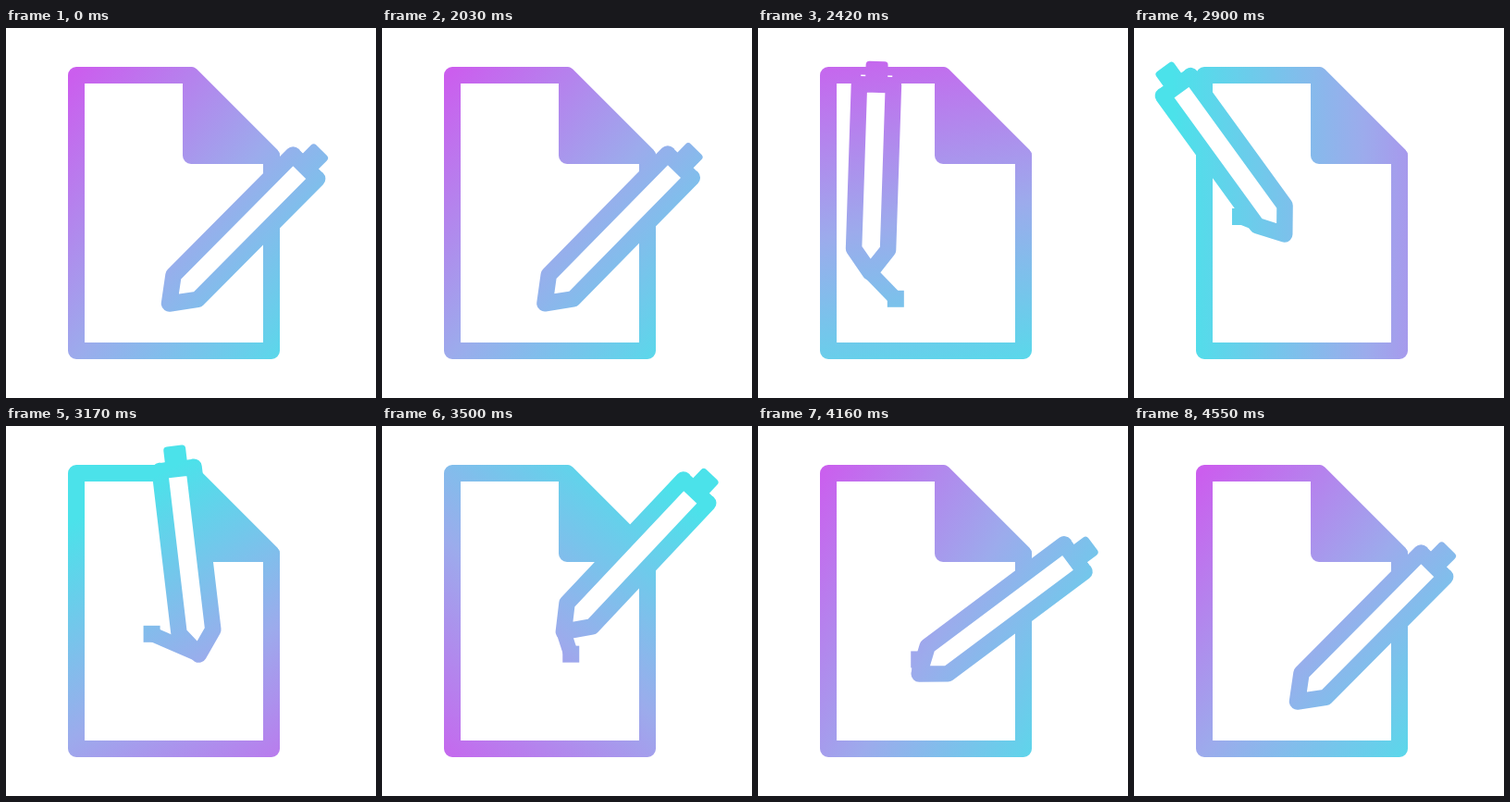
An HTML page with a canvas that plays this animation: 400x400 px, repeating every 4580 ms.

```html
<!DOCTYPE html>
<html lang="en">
<head>
<meta charset="utf-8">
<title>Writing pen</title>
<style>
  html, body { margin: 0; width: 100%; height: 100%; overflow: hidden; background: #fff; }
  canvas { display: block; width: 100vw; height: 100vh; }
</style>
</head>
<body>
<canvas></canvas>
<script>
const LOOP = 4580, HOLD = 2030, STEP = 30, SIZE = 400;
const BEGIN = 2000, END = 4550;

const smooth = u => u * u * (3 - 2 * u);
const clamp = u => Math.min(1, Math.max(0, u));

// Eases from one turning point [time, value] to the next
const track = (...points) => t => points.reduce((v, [time, to], i) => {
  if (!i) return to;
  const from = points[i - 1][0];
  return v + (to - v) * smooth(clamp((t - from) / (time - from)));
}, 0);

const tipX = track([BEGIN, 176.5], [2560, 111], [3220, 210], [3900, 173], [END, 176.5]);
const tipY = track([BEGIN, 298], [2900, 223], [3240, 250], [3740, 198], [4400, 298]);
const lean = track([BEGIN, 44.8], [2820, -38], [3760, 62], [END, 44.8]);
const tailX = track([BEGIN, 176.5], [2900, 115], [3460, 205], [3900, 173], [END, 176.5]);
const tailY = track([2340, 298], [2900, 204], [3460, 248], [3880, 195], [4400, 298]);

const canvas = document.querySelector('canvas');
const ctx = canvas.getContext('2d');
const dpr = window.devicePixelRatio || 1;
canvas.width = canvas.height = SIZE * dpr;
ctx.scale(dpr, dpr);

const paper = new Path2D('M200 51H76V349H287V138Z');
const fold = new Path2D('M200 51V138H287Z');

// One full turn of the colours around a point below the centre
function shade(t) {
  const u = clamp((t - BEGIN) / (END - BEGIN));
  const turn = smooth(1 - (1 - u) ** 1.25);
  const a = (42 + 360 * turn) * Math.PI / 180;
  const pivot = 225, length = 410, mid = .56;
  const at = k => [pivot + Math.cos(a) * length * k, pivot + Math.sin(a) * length * k];
  const g = ctx.createLinearGradient(...at(-mid), ...at(1 - mid));
  g.addColorStop(0, '#cb5eee');
  g.addColorStop(.5, '#9cabec');
  g.addColorStop(1, '#4be2ea');
  return g;
}

function paint(path, stroke, width, fill) {
  if (fill) {
    ctx.fillStyle = fill;
    ctx.fill(path);
  }
  ctx.strokeStyle = stroke;
  ctx.lineWidth = width;
  ctx.stroke(path);
}

// Short stroke of ink with a square end
function drawTrail(x, y, endX, endY, ink) {
  if (Math.hypot(endX - x, endY - y) < 3) return;
  paint(new Path2D(`M${x} ${y}L${endX} ${endY}`), ink, 16);
  ctx.fillStyle = ink;
  ctx.fillRect(endX - 9, endY - 9, 18, 18);
}

function drawPen(x, y, angle, ink) {
  const pose = new DOMMatrix().translate(x, y).rotate(angle);
  const len = 203 + 8 * Math.sin(angle * Math.PI / 180);
  const place = d => {
    const p = new Path2D();
    p.addPath(new Path2D(d), pose);
    return p;
  };
  paint(place(`M0 0L-18.5 -25V${-len}H18.5V-25Z`), ink, 17.5, '#fff');
  paint(place(`M-17 ${-len - 9.3}H17`), '#fff', 1.5);
  paint(place(`M-8 ${-len - 5}V${-len - 21}H8V${-len - 5}Z`), ink, 8, ink);
}

function draw(time) {
  const t = time < HOLD ? 0 : HOLD + Math.floor((time - HOLD) / STEP) * STEP;
  const ink = shade(t), x = tipX(t), y = tipY(t);
  ctx.fillStyle = '#fff';
  ctx.fillRect(0, 0, SIZE, SIZE);
  ctx.lineJoin = 'round';
  paint(paper, ink, 18);
  paint(fold, ink, 18, ink);
  drawTrail(x, y, tailX(t), tailY(t), ink);
  drawPen(x, y, lean(t), ink);
}

const start = performance.now();
function tick() {
  draw((performance.now() - start) % LOOP);
  requestAnimationFrame(tick);
}
tick();
</script>
</body>
</html>
```
